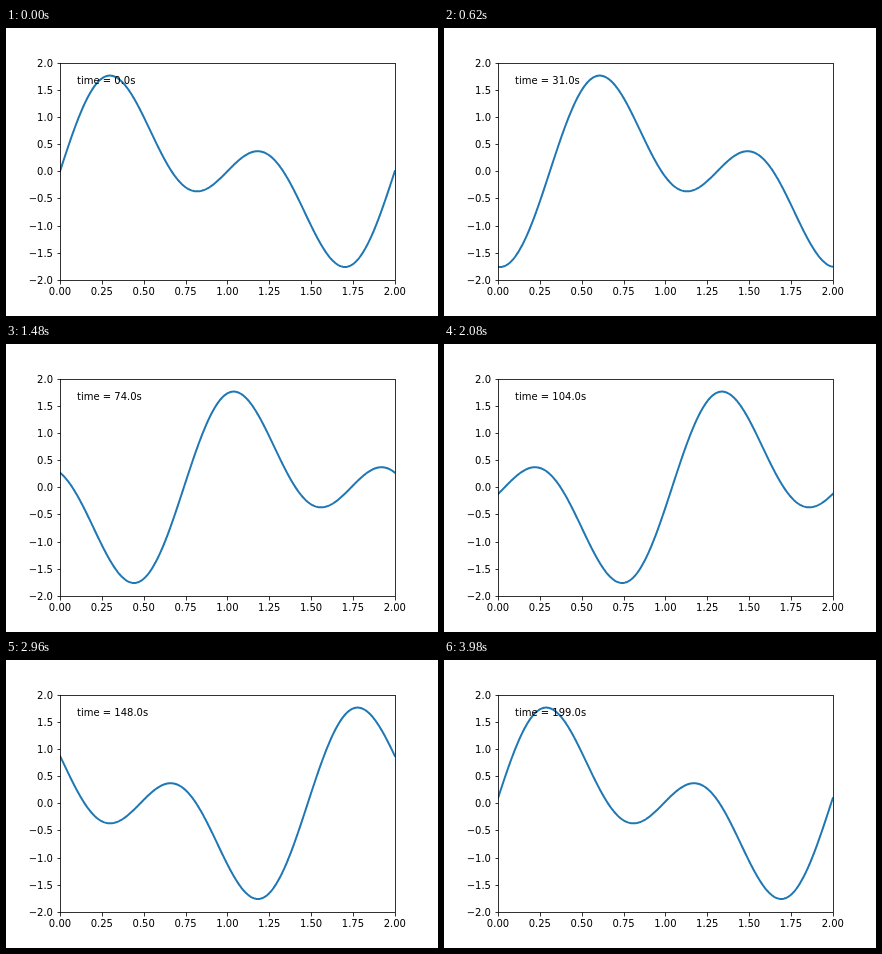
Recreate the animation shown at these times as an HTML page. Size 432 px wide and 288 px high, loop 4 s.

```html
<!DOCTYPE html>
<html lang="en">
<head>
<meta charset="utf-8">
<title>Travelling wave</title>
<style>
html, body { margin: 0; width: 432px; height: 288px; overflow: hidden; background: #fff; }
svg { display: block; }
text { font: 10px "DejaVu Sans", sans-serif; white-space: pre; }
.axis { fill: none; stroke: #000; stroke-width: .8; }
#wave { fill: none; stroke: #1f77b4; stroke-width: 2; stroke-linejoin: round; stroke-linecap: square; }
</style>
</head>
<body>
<svg width="432" height="288" viewBox="0 0 432 288">
  <clipPath id="plot"><rect x="54" y="35" width="335" height="217"/></clipPath>
  <path id="wave" clip-path="url(#plot)"/>
  <rect class="axis" x="54.5" y="35.5" width="335" height="217"/>
  <path id="ticks" class="axis"/>
  <g id="labels"></g>
  <text id="clock" x="71" y="56"></text>
</svg>
<script>
const $ = id => document.getElementById(id);
const px = x => 54 + 167.4 * x;
const py = y => 143.28 - 54.36 * y;

function label(text, x, y, anchor) {
  const el = document.createElementNS("http://www.w3.org/2000/svg", "text");
  el.textContent = text;
  el.setAttribute("x", x);
  el.setAttribute("y", y);
  el.setAttribute("text-anchor", anchor);
  $("labels").append(el);
}

let ticks = "";
for (let i = 0; i <= 8; i++) {
  const xv = i / 4, yv = i / 2 - 2;
  const row = Math.round(py(yv));
  ticks += `M${Math.round(px(xv)) + .5} 252.5v4M54.5 ${row + .5}h-3`;
  label(xv.toFixed(2), px(xv), 267, "middle");
  label(yv.toFixed(1).replace("-", "\u2212"), 47, row + 4, "end");
}
$("ticks").setAttribute("d", ticks);

function draw() {
  const step = Math.floor(performance.now() / 20) % 200;
  const points = [];
  for (let i = 0; i <= 400; i++) {
    const x = i / 200, a = Math.PI * (x - step / 100);
    const y = Math.sin(a) + Math.sin(2 * a);
    points.push(px(x).toFixed(2) + " " + py(y).toFixed(2));
  }
  $("wave").setAttribute("d", "M" + points.join("L"));
  $("clock").textContent = `time = ${step.toFixed(1)}s`;
  requestAnimationFrame(draw);
}
draw();
</script>
</body>
</html>
```
